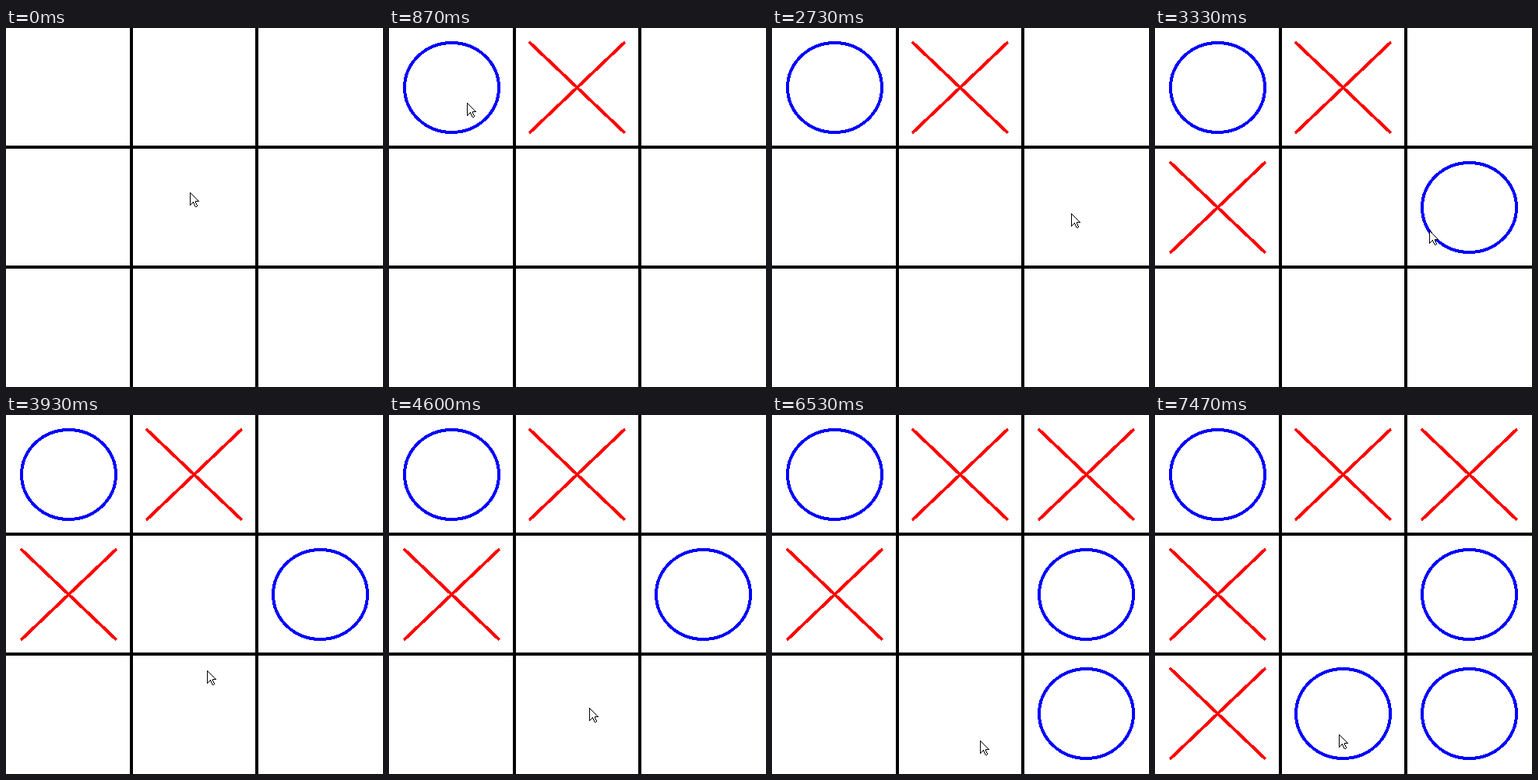
Animation, 484 px wide and 461 px high, one loop 8000 ms. Source, as an HTML page:

```html
<!DOCTYPE html>
<html lang="en">
<head>
<meta charset="utf-8">
<title>Noughts and crosses</title>
<style>
  html, body { margin: 0; width: 100%; height: 100%; overflow: hidden; background: #fff; }
  svg { display: block; shape-rendering: crispEdges; }
  #board { fill: none; stroke-width: 4; }
</style>
</head>
<body>
<svg width="484" height="461" viewBox="0 0 484 461">
  <g id="board">
    <path stroke="#000" d="M161 0V461M322 0V461M0 153H484M0 307H484"/>
  </g>
  <path id="cursor" fill="#fff" stroke="#000"
    d="M.5 .5V16.5L4.5 12.5L6.5 17.5L7.5 18.5H8.5L9.5 17.5L7.5 12.5V11.5H11.5Z"/>
</svg>
<script>
const LOOP = 8000, FPS = 15;
const board = document.getElementById('board');
const cursor = document.getElementById('cursor');

// Cells are numbered 0 to 8, row by row
const turns = [
  { tick: 13, o: 0, x: 1 },
  { tick: 43, o: 5, x: 3 },
  { tick: 78, o: 8, x: 2 },
  { tick: 110, o: 7, x: 6 }
];

// Pointer strokes; a bend is the control point of a curved one
const home = [236, 211];
const strokes = [
  { from: 0, until: 11, to: [100, 96] },
  { from: 15, until: 28, to: [315, 268], bend: [238, 272] },
  { from: 28, until: 32, to: [381, 250] },
  { from: 37, until: 41, to: [384, 238] },
  { from: 47, until: 60, to: [247, 335] },
  { from: 60, until: 73, to: [300, 387], bend: [212, 372] },
  { from: 73, until: 75, to: [400, 380] },
  { from: 85, until: 87, to: [393, 380] },
  { from: 89, until: 99, to: [244, 417], bend: [363, 425] },
  { from: 101, until: 102, to: [244, 416] },
  { from: 106, until: 107, to: [238, 413] },
  { from: 111, until: 112, to: [236, 410] }
];

function addShape(tag, attrs) {
  const el = document.createElementNS('http://www.w3.org/2000/svg', tag);
  for (const key in attrs) el.setAttribute(key, attrs[key]);
  return board.appendChild(el);
}

function centre(cell) {
  const col = cell % 3, row = Math.floor(cell / 3);
  return [80.5 + Math.floor(161.5 * col), 76.5 + Math.round(153.7 * row)];
}

function nought(cell) {
  const [cx, cy] = centre(cell);
  return addShape('ellipse', { cx, cy, rx: 60.5, ry: 57.5, stroke: '#00f' });
}

function cross(cell) {
  const [x, y] = centre(cell);
  const d = `M${x - 61.5} ${y - 58.5}l123 117m0 -117l-123 117`;
  return addShape('path', { d, stroke: '#f00' });
}

const marks = turns.map(({ tick, o, x }) => ({ tick, shapes: [nought(o), cross(x)] }));

function pointerAt(tick) {
  let pos = home;
  for (const { from, until, to, bend } of strokes) {
    if (tick <= from) break;
    const p = Math.min(1, (tick - from) / (until - from)), q = 1 - p;
    pos = pos.map((a, i) => {
      const mid = bend ? bend[i] : (a + to[i]) / 2;
      return q * q * a + 2 * q * p * mid + p * p * to[i];
    });
  }
  return pos.map(Math.round);
}

function draw(now) {
  // Small lead keeps ticks on times rounded to 10 ms
  const tick = Math.floor((now % LOOP + 3.4) * FPS / 1000) % (LOOP * FPS / 1000);
  for (const mark of marks)
    for (const shape of mark.shapes)
      shape.setAttribute('visibility', tick >= mark.tick ? 'visible' : 'hidden');
  cursor.setAttribute('transform', `translate(${pointerAt(tick)})`);
}

const start = performance.now();
function loop() {
  draw(performance.now() - start);
  requestAnimationFrame(loop);
}
loop();
</script>
</body>
</html>
```
